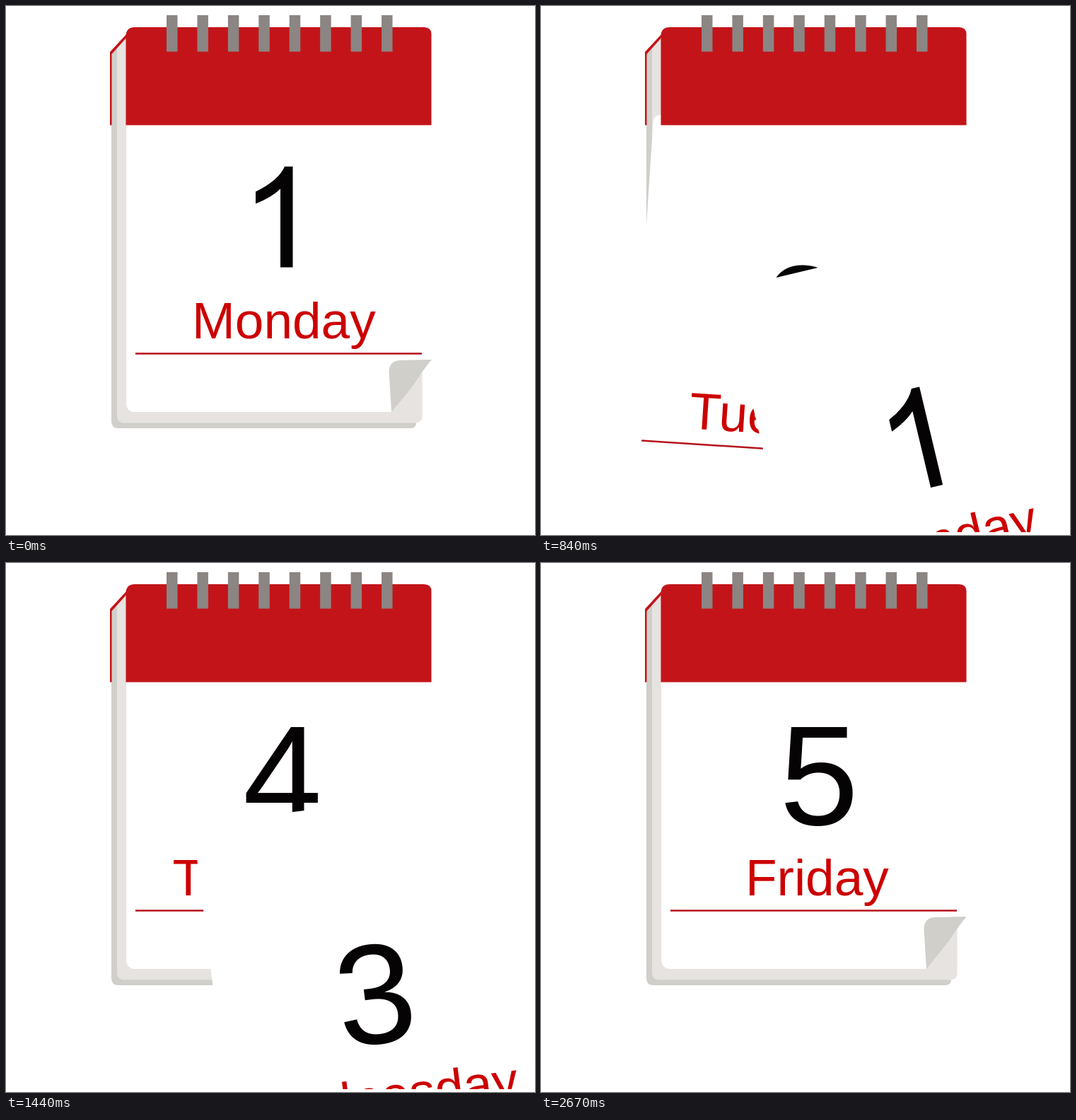
These frames come from a looping animation (748x748 px, 2700 ms). An HTML page:

```html
<!DOCTYPE html>
<html lang="en">
<head>
<meta charset="utf-8">
<title>Tear-off calendar</title>
<style>
  html, body { margin: 0; height: 100%; overflow: hidden; background: #fff; }
  svg { display: block; }
  text { font-family: "Liberation Sans", Arial, sans-serif; }
  .day { font-size: 73px; fill: #c00; }
  .number { font-size: 201px; }
  .number, .one { fill: #050304; }
</style>
</head>
<body>
<svg width="744" height="744" viewBox="0 0 744 744">
  <path fill="#d0cfca" d="M149 67L160 56V580H580V589Q580 597 572 597H159Q149 597 149 587Z"/>
  <path fill="#e6e3e1" d="M157 59L172 43V500H588.500V579Q588.500 589.500 578 589.500H167Q157 589.500 157 579Z"/>
  <g id="pages"></g>
  <g fill="#c31519">
    <path d="M169.500 168.500V42Q170 30 182 30H591Q601.500 30 601.500 40V168.500Z"/>
    <path d="M147 168.500V65L172 38V43L149.500 68V168.500Z"/>
  </g>
  <g id="rings" fill="#8b8583"></g>
</svg>
<script>
const LOOP = 2700, STEP = 30, UNIT = 240;

// Front page first. dx, dy and turn are the offsets reached UNIT ms after start.
const pages = [
  { n: 1, day: 'Monday', dayX: 263, start: 600, dx: 147.5, dy: 314, turn: -13.4 },
  { n: 2, day: 'Tuesday', dayX: 248, numX: 342, start: 730, dx: -116, dy: 298, turn: 8.57 },
  { n: 3, day: 'Wednesday', dayX: 197, numX: 340.2, start: 1200, dx: 126, dy: 311, turn: -7.1 },
  { n: 4, day: 'Thursday', dayX: 235.5, numX: 335.1, start: 1440, dx: -143, dy: 311, turn: 12.4 },
  { n: 5, day: 'Friday', dayX: 289, numX: 337.3, start: Infinity }
];

const numberMark = p => p.n === 1
  ? '<path class="one" d="M405.500 369.500H388V258.500Q375 271 353 279.500V262.500Q385 247 394 227H405.500Z"/>'
  : `<text class="number" x="${p.numX}" y="369.500">${p.n}</text>`;

const pageMark = p => `<g>
  <path fill="#fff" d="M182 30H591Q601 30 601 40V500L545 574H184Q170 574 170 560V42Q170 30 182 30Z"/>
  ${numberMark(p)}
  <text class="day" x="${p.dayX}" y="470">${p.day}</text>
  <path stroke="#b5121b" stroke-width="2.500" d="M183 491.500H588"/>
  <path fill="#d0cfc9" d="M545 574L541.500 518Q541 502 557 501L601.500 500Q589 515 577 534Q570 543 545 574Z"/>
</g>`;

const layer = document.getElementById('pages');
layer.innerHTML = [...pages].reverse().map(pageMark).join('');
const groups = [...layer.children].reverse();

document.getElementById('rings').innerHTML = Array.from({ length: 8 }, (_, i) =>
  `<rect x="${227 + i * 43.43}" y="13" width="15.500" height="51.500"/>`).join('');

function draw(now) {
  const t = Math.floor(now % LOOP / STEP) * STEP;
  pages.forEach((p, i) => {
    const e = (t - p.start) / UNIT;
    if (e <= 0) return groups[i].removeAttribute('transform');
    const x = p.dx * e ** 1.784, y = p.dy * e, angle = p.turn * e ** 1.07;
    groups[i].setAttribute('transform', `translate(${x} ${y}) rotate(${angle} 385.5 302)`);
  });
}

const begin = performance.now();
function tick() {
  draw(performance.now() - begin);
  requestAnimationFrame(tick);
}
tick();
</script>
</body>
</html>
```
